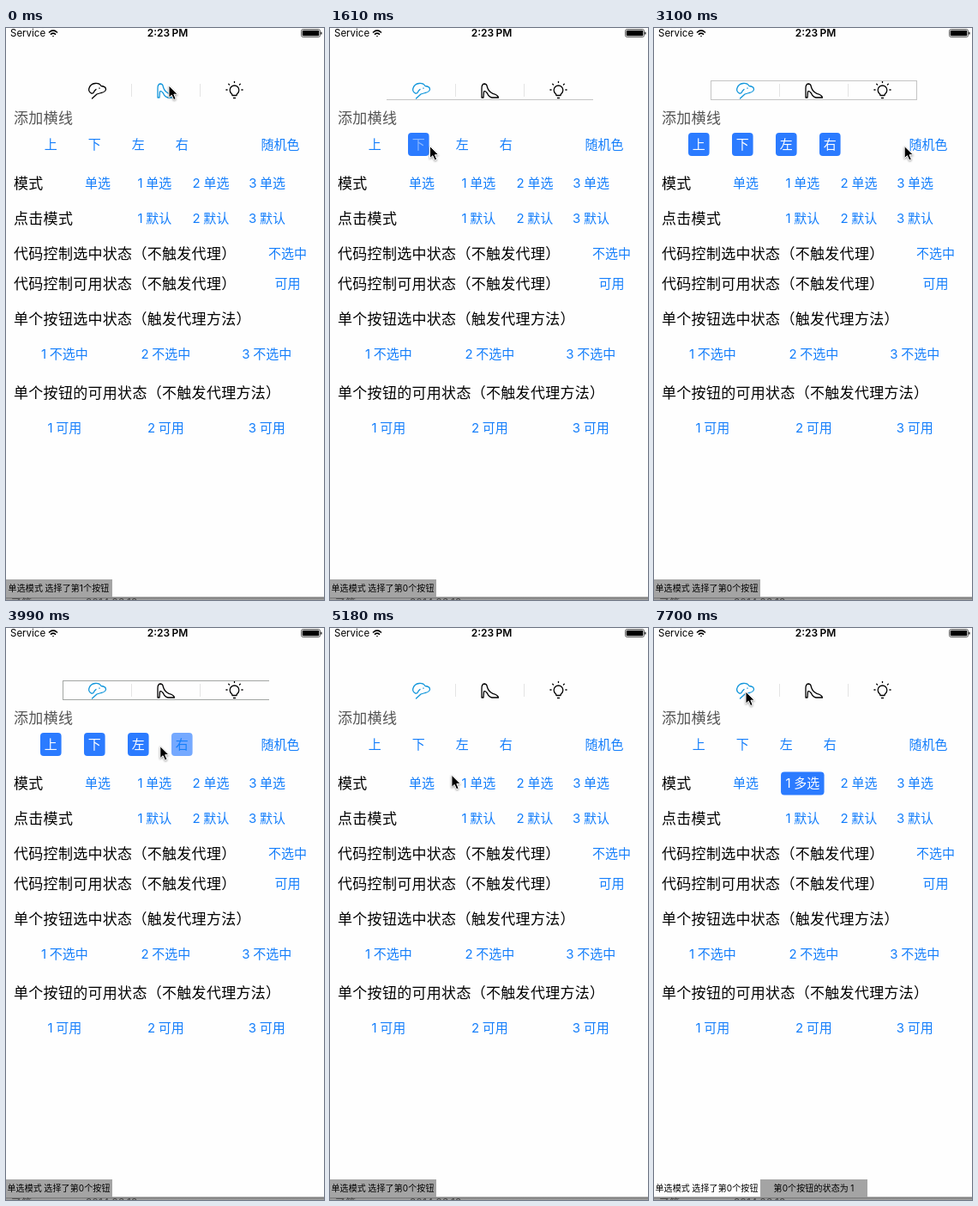
Write an HTML page that moves like this. It is 371 px wide and 666 px high and loops after 8000 ms.

```html
<!DOCTYPE html>
<html lang="zh-CN">
<head>
<meta charset="utf-8">
<style>
html, body { margin: 0; width: 100%; height: 100%; overflow: hidden; background: #fefefe; }
svg { display: block; }
text { font-family: Inter, "Noto Sans CJK SC", "Noto Sans CJK", sans-serif; word-spacing: -.6px; white-space: pre; }
.heading { letter-spacing: .3px; }
.message { letter-spacing: .12px; }
.line { fill: none; stroke: #000; stroke-width: 1.3; stroke-linecap: round; stroke-linejoin: round; }
.edge { stroke: #c4c4c4; }
</style>
</head>
<body>
<svg id="stage" width="371" height="666" viewBox="0 0 371 666">
  <defs>
    <linearGradient id="shade" x2="0" y2="1">
      <stop stop-color="#6e6e6e"/><stop offset="1" stop-color="#a8a8a8"/>
    </linearGradient>
  </defs>
</svg>
<script>
const stage = document.getElementById('stage');
const BLUE = '#147efb', ACTIVE = '#2b7bff', FADED = '#8ab7ff', ICON_BLUE = '#1296db';
const LOOP = 8000, STEP = 148, LAST = 52;

function set(node, attrs) {
  for (const key in attrs) node.setAttribute(key, attrs[key]);
  return node;
}
function add(tag, attrs, content = '') {
  const node = document.createElementNS('http://www.w3.org/2000/svg', tag);
  node.textContent = content;
  stage.append(node);
  return set(node, attrs);
}
// Text placed by the vertical centre of its CJK glyphs
function label(content, x, cy, size, attrs = {}) {
  return add('text', { x, y: cy + size * .365, 'font-size': size, ...attrs }, content);
}
function rect(x, y, width, height, fill, rx = 0) {
  return add('rect', { x, y, width, height, fill, rx });
}
function path(d, attrs = { class: 'line' }) { return add('path', { d, ...attrs }); }
function button(content, cx, cy, width = 0) {
  const back = set(rect(cx - width / 2, cy - 13.5, width, 27, ACTIVE, 4), { opacity: 0 });
  const text = label(content, cx, cy, 15, { fill: BLUE, 'text-anchor': 'middle' });
  return { cx, cy, back, text };
}
function buttonRow(name, firstX, gap, cy) {
  for (let i = 0; i < 3; i++) button(`${i + 1} ${name}`, firstX + gap * i, cy);
}

// Status bar
label('Service', 5, 6, 11.5);
path('M50.5 5Q55 .8 59.5 5M52.5 7.2Q55 5 57.5 7.2M55 9.5V9.6', { class: 'line', style: 'stroke-width:1.6' });
label('2:23 PM', 188.5, 6, 12, { 'text-anchor': 'middle', 'font-weight': 600 });
set(rect(344.5, 1.5, 22, 9, 'none', 2), { stroke: '#000', 'stroke-width': .6 });
rect(345.7, 2.7, 19.6, 6.6, '#000', 1);
rect(367.3, 4.5, 1.2, 3, '#000', .6);

// Segmented icons: dog, shoe, bulb
const dogIcon = path('M99.5 76Q96 74 96.8 70.5Q98.5 65 104 64.5Q109 64 111 67.5Q116.5 68 116.5 71.5Q116 74.5 111 75.5L106 77L100.5 82M99.5 76Q102.5 76.5 103 73.5L105 71.5M109 70V70.3');
const shoeIcon = path('M177 81V70Q177 65 180.5 65Q183 65.3 183.5 69Q185 74 190 76.3Q196 78 196.5 81H189Q185 80 183.5 76Q181 72.5 179.5 74L179 81Z');
path('M264 78.5Q264 77 262.7 76A5.3 5.3 0 1 1 270.3 76Q269 77 269 78.5ZM265.5 81.5H267.5');
for (let angle = 0; angle <= 180; angle += 45)
  path('M8.4 0H9.6', { class: 'line', transform: `translate(266.5 72) rotate(${-angle})` });
for (const x of [146, 226]) rect(x, 65, 1, 15, '#e4e4e4');

// Headings
const headings = { 添加横线: 104.5, 模式: 181, 点击模式: 222, '代码控制选中状态（不触发代理）': 262.5,
  '代码控制可用状态（不触发代理）': 298, '单个按钮选中状态（触发代理方法）': 339,
  '单个按钮的可用状态（不触发代理方法）': 425 };
for (const [name, cy] of Object.entries(headings))
  label(name, 9, cy, 17, { class: 'heading', fill: name === '添加横线' ? '#555' : '#000' });

// Buttons
const edges = { 上: 'M66 61.5H307', 下: 'M66 83.5H307', 左: 'M66.5 61V84', 右: 'M306.5 61V84' };
const sides = Object.entries(edges).map(([name, d], i) => ({
  ...button(name, 52.3 + 51 * i, 135.5, 24.6), edge: path(d, { class: 'edge' })
}));
const [up, down, left, right] = sides;
const randomColor = button('随机色', 320, 135.5);
button('单选', 107, 181);
const mode = button('1 单选', 173.3, 181, 50.5);
const secondMode = button('2 单选', 239, 181);
button('3 单选', 304.6, 181);
button('不选中', 328.5, 262.5);
button('可用', 328.5, 298);
buttonRow('默认', 173.3, 65.6, 222);
buttonRow('不选中', 68.3, 118, 380);
buttonRow('可用', 68.3, 118, 466);

// Messages above the shaded bottom edge
rect(0, 662.5, 371, 3.5, 'url(#shade)');
label('了第', 6, 670, 12, { fill: '#444' });
label('2014 06 12', 93, 669, 12, { fill: '#444' });
const messageBack = rect(0, 642, 124, 21, '#a4a4a4');
const centred = { class: 'message', 'text-anchor': 'middle' };
const message = label('', 61.5, 652.5, 10, centred);
const reply = label('', 186.5, 652.5, 10, centred);

const cursor = path('M0 0V14.2L3.3 11.2L5.7 16.6L8.2 15.5L5.9 10.2H10.3Z',
  { stroke: '#fff', style: 'filter:drop-shadow(0 1px 1px #0006)' });

// The pointer's tour: sides are switched on every third step, off every second
const dog = { cx: 107, cy: 72 }, shoe = { cx: 190, cy: 65 };
const visit = (at, target) => ({ at, target });
const tour = [
  visit(0, shoe), visit(3, dog), visit(5, dog),
  ...[down, left, right, up].map((side, i) => visit(10 + 3 * i, side)),
  visit(21.5, randomColor), visit(24, randomColor),
  ...[right, left, down, up].map((side, i) => visit(26 + 2 * i, side)),
  visit(36.5, mode), visit(40.5, mode), visit(43, secondMode), visit(49, dog), visit(LAST, dog)
];
for (const side of sides)
  [side.on, side.off] = tour.filter(v => v.target === side).map(v => v.at + 1);

function pointerAt(step) {
  const next = Math.max(1, tour.findIndex(v => v.at >= step));
  const from = tour[next - 1], to = tour[next];
  const p = (step - from.at) / (to.at - from.at), eased = p * p * (3 - 2 * p);
  const mix = key => from.target[key] + (to.target[key] - from.target[key]) * eased;
  return [mix('cx'), mix('cy') + 2];
}

function draw(time) {
  const step = Math.min(LAST, Math.floor((time % LOOP + 25) / STEP));
  const dogChosen = step >= 4, recolored = step >= 23, multiple = step >= 40, replied = step >= 50;

  set(dogIcon, { style: `stroke:${dogChosen ? ICON_BLUE : '#000'}` });
  set(shoeIcon, { style: `stroke:${dogChosen ? '#000' : ICON_BLUE}` });

  for (const { on, off, back, text, edge } of sides) {
    const shown = step >= on && step < off;
    const pressed = step === on - 1 || step === off - 1;
    set(edge, { opacity: +shown, style: recolored ? 'stroke:#a2a5a3' : '' });
    set(back, { opacity: shown ? 1 : step === off ? .65 : 0 });
    set(text, { fill: step === on ? FADED : shown ? '#fff' : BLUE, opacity: pressed ? .4 : 1 });
  }
  set(randomColor.text, { opacity: step === 22 || step === 24 ? .3 : 1 });

  mode.text.textContent = multiple ? '1 多选' : '1 单选';
  set(mode.text, { fill: step === 40 ? FADED : multiple ? '#fff' : BLUE });
  set(mode.back, { opacity: +multiple });

  message.textContent = `单选模式 选择了第${dogChosen ? 0 : 1}个按钮`;
  reply.textContent = replied ? '第0个按钮的状态为 1' : '';
  set(messageBack, { x: replied ? 124 : 0, width: replied ? 125 : 124 });

  set(cursor, { transform: `translate(${pointerAt(step)})` });
}

const start = performance.now();
function tick() {
  draw(performance.now() - start);
  requestAnimationFrame(tick);
}
tick();
</script>
</body>
</html>
```
